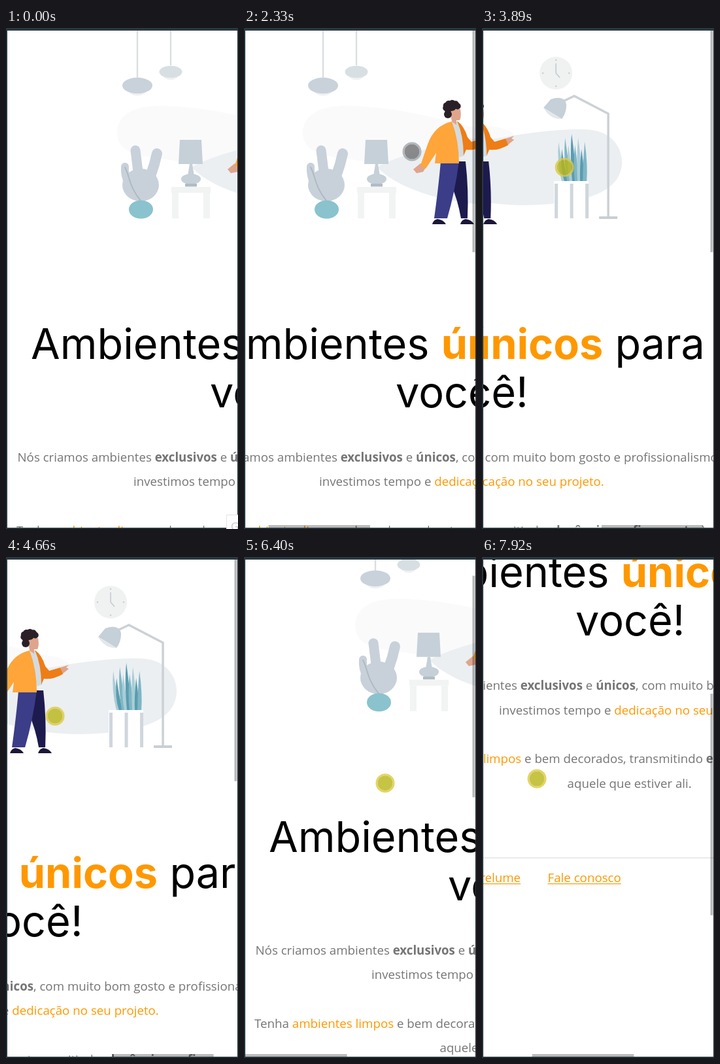
Recreate the animation shown at these times as an HTML page with a canvas. Size 355 px wide and 766 px high, loop 7990 ms.

```html
<!DOCTYPE html>
<html lang="pt-BR">
<head>
<meta charset="utf-8">
<title>Ambientes únicos</title>
<style>
html, body { margin: 0; width: 100%; height: 100%; overflow: hidden; background: #fff; }
canvas { display: block; width: 355px; height: 766px; }
</style>
</head>
<body>
<canvas id="stage"></canvas>
<script>
const W = 355, H = 766, LOOP = 7990;
const VIEW = { x: 2, y: 4, w: 352, h: 760 };
const PAGE = { w: 796, h: 1705 };
const canvas = document.getElementById('stage');
const ctx = canvas.getContext('2d');
const dpr = window.devicePixelRatio || 1;
canvas.width = W * dpr;
canvas.height = H * dpr;

const ZOOM = .9;
const SIZE = 20.8 * ZOOM, LINE = SIZE * 2;
const BODY = `${SIZE}px "Open Sans", sans-serif`;
const BOLD = 'bold ' + BODY;
const TITLE = `${72 * ZOOM}px Inter, sans-serif`;
const ORANGE = '#ff9800', GREY = '#757575', STONE = '#c5d0d8', PALE = '#f2f3f3', SKIN = '#dfa58c';

// The pointer flies in, then pulls the page with a few drags
const drag = (start, end, from, to) => ({ start, end, from, to });
const ENTER = drag(420, 1190, [372, 330], [245, 169]);
const DRAGS = [
  drag(1640, 2330, [337, 180], [257, 189]),
  drag(2600, 3050, [340, 196], [140, 204]),
  drag(3420, 3900, [255, 208], [126, 213]),
  drag(4400, 5220, [28, 236], [226, 266]),
  drag(5500, 6050, [5, 300], [216, 401]),
  drag(6220, 6840, [216, 401], [216, 130]),
  drag(7080, 7930, [253, 528], [84, 339])
];

const clamp = (v, lo, hi) => Math.min(hi, Math.max(lo, v));

function glide(t, start, end, from, to) {
  const u = clamp((t - start) / (end - start), 0, 1), k = u * u * (3 - 2 * u);
  return from.map((v, i) => v + (to[i] - v) * k);
}

function pose(t) {
  let last = ENTER, down = false, scroll = [0, 0];
  let point = glide(t, ENTER.start, ENTER.end, ENTER.from, ENTER.to);
  const limit = [PAGE.w - VIEW.w, PAGE.h - VIEW.h];
  for (const d of DRAGS) {
    if (t < last.end) break;
    point = glide(t, last.end, d.start, last.to, d.from);
    if (t < d.start) break;
    point = glide(t, d.start, d.end, d.from, d.to);
    scroll = scroll.map((s, i) => clamp(s + d.from[i] - point[i], 0, limit[i]));
    down = t < d.end;
    last = d;
  }
  return { point, scroll, down };
}

function rect(x, y, w, h, color) {
  ctx.fillStyle = color;
  ctx.fillRect(x, y, w, h);
}

function oval(x, y, rx, ry, color) {
  ctx.fillStyle = color;
  ctx.beginPath();
  ctx.ellipse(x, y, rx, ry, 0, 0, Math.PI * 2);
  ctx.fill();
}

function shape(d, color) {
  ctx.fillStyle = color;
  ctx.fill(new Path2D(d));
}

function line(d, color, width) {
  ctx.strokeStyle = color;
  ctx.lineWidth = width;
  ctx.stroke(new Path2D(d));
}

function shifted(dx, draw) {
  ctx.save();
  ctx.translate(dx, 0);
  draw();
  ctx.restore();
}

function pendant(x, y, r, color) {
  rect(x - 1.2, -10, 2.4, y, '#d9dee0');
  oval(x, y + 3, r * .72, r * .54, '#eff1f2');
  oval(x, y, r, r * .53, color);
}

function plant() {
  ctx.lineCap = 'round';
  line('M206 252L198 187', '#c8d1da', 15);
  line('M209 252Q224 225 231 192', '#c8d1da', 16);
  line('M206 252Q180 240 182 212', '#c8d1da', 12);
  oval(206, 240, 28, 25, '#c8d1da');
  line('M182 213C190 228 188 242 206 264', '#aebac2', 2);
  ctx.lineCap = 'butt';
  oval(206.5, 277.5, 18.5, 14, '#8ac3cd');
}

function tableLamp() {
  shape('M266 171H299L301 208H264Z', STONE);
  shape('M281 208H285L288 226H278Z', STONE);
  oval(283, 231, 15, 8, STONE);
  rect(274, 238, 18, 4.5, '#b0bcc4');
  rect(253, 243, 60, 9, PALE);
  for (const x of [254, 302]) rect(x, 252, 10, 39, PALE);
}

function man() {
  // Legs and shoes
  for (const x of [157, 200]) shape(`M${x} 300Q${x + 2} 293 ${x + 8} 292Q${x + 17} 293 ${x + 21} 300Z`, '#1b1738');
  shape('M186 204H208Q213 248 211 291H201Q196 262 186 240Z', '#1d1a4e');
  shape('M170 204H198Q192 250 180 291H160Q167 240 170 204Z', '#3b3d88');
  // Hands
  shape('M139 207L128 216L133 222L143 220L148 212Z', SKIN);
  shape('M234 169L247 165L243 169L247 171L237 179Z', SKIN);
  // Shirt and jacket
  shape('M187 143H196Q206 168 206 195L198 198Z', '#d3dbe0');
  shape('M195 142Q206 150 211 167L217 174L234 169L238 179Q222 188 209 186L205 195Q205 165 195 142Z', '#ee7d16');
  shape('M187 143Q160 149 150 178L139 210L147 215L163 191L161 207H198Q198 172 187 143Z', '#ffa53a');
  // Head
  shape('M184 124H200Q202 136 199 141H194V148L187 143Z', SKIN);
  for (let i = 0; i < 7; i++) {
    const a = 2.3 + i * .62;
    oval(187 + Math.cos(a) * 9, 121 + Math.sin(a) * 6, 5, 5, '#2b2028');
  }
  oval(186, 121, 8, 6, '#2b2028');
  oval(181, 132, 6, 6, '#2b2028');
}

function clock() {
  oval(113, 69, 25, 25, '#f0f1f1');
  for (let a = 0; a < 4; a++)
    oval(113 + 20 * Math.cos(a * Math.PI / 2), 69 + 20 * Math.sin(a * Math.PI / 2), 1.3, 1.3, '#c8cfd3');
  line('M113 54V69L119 76', '#c3ccd2', 1.6);
}

function floorLamp() {
  line('M124 112L141 104L193 131V289', '#cbd1d5', 3.5);
  shape('M94 122L105 109Q126 102 129 117Q129 130 122 139Z', STONE);
  shape('M94 122L122 139Q104 140 94 122Z', '#e2e8eb');
  rect(179, 288, 28, 4, '#c8cfd4');
}

function leafStand() {
  const tones = ['#a9cdd6', '#5a9cb0', '#7fb6c4'];
  for (let i = 0; i < 9; i++) {
    const x = 125 + i * 4, tip = 137 + (i - 4) * 5;
    const top = 162 + Math.abs(i - 4) * 3 + (i % 2) * 14;
    shape(`M${x - 3} 235Q${tip - 3} ${top + 30} ${tip} ${top}Q${tip + 5} ${top + 35} ${x + 3} 235Z`, tones[i % 3]);
  }
  rect(110, 234, 53, 57, '#fff');
  for (let i = 0; i < 3; i++) rect(111 + i * 23.5, 238, 5, 53, '#cfd6dc');
}

function illustration() {
  shape('M170 160C171 132 196 118 240 119C310 121 375 137 421 150Q458 154 462 170L420 220L290 215C262 190 171 212 170 160Z', '#fafafb');
  shape('M284 213C330 185 480 154 560 155C604 153 623 180 623 205C623 245 580 270 470 271C390 270 315 246 284 213Z', '#ebeff2');
  pendant(201, 88, 23, '#c9d2db');
  pendant(252, 67, 17.5, '#d8dfe3');
  plant();
  tableLamp();
  shifted(211, man);
  shifted(409, () => { clock(); floorLamp(); leafStand(); });
}

// Runs are [text, font, color]; returns the end position
function write(x, y, ...runs) {
  for (const [text, font, color] of runs) {
    ctx.font = font;
    ctx.fillStyle = color;
    ctx.fillText(text, x, y);
    x += ctx.measureText(text).width;
  }
  return x;
}

function link(text, x, y) {
  const end = write(x, y, [text, BODY, ORANGE]);
  rect(x, y + 2, end - x, 1.2, ORANGE);
}

function copy() {
  const title = s => [s, TITLE, '#000'];
  const text = (s, color = GREY) => [s, BODY, color];
  const bold = s => [s, BOLD, GREY];
  const row = n => 663 + n * LINE;

  write(38, 506, title('Ambientes '), ['únicos', 'bold ' + TITLE, ORANGE], title(' para'));
  write(312, 580, title('você!'));
  write(17.5, row(0), text('Nós criamos ambientes '), bold('exclusivos'), text(' e '), bold('únicos'),
    text(', com muito bom gosto e profissionalismo,'));
  write(195, row(1), text('investimos tempo e '), text('dedicação no seu projeto.', ORANGE));
  write(16, row(3), text('Tenha '), text('ambientes limpos', ORANGE), text(' e bem decorados, transmitindo '),
    bold('elegância'), text(' e '), bold('refinamento'), text(' à'));
  write(299.5, row(4), text('aquele que estiver ali.'));

  rect(2, 919, 784, 2, '#e8eaec');
  ctx.font = BODY;
  link('Vitrelume', 228 - ctx.measureText('Vitrelume').width, 957);
  link('Fale conosco', 269.5, 957);
}

function scrollbars([sx, sy]) {
  const color = 'rgba(0,0,0,.27)', kx = VIEW.w / PAGE.w, ky = VIEW.h / PAGE.h;
  rect(349.5, VIEW.y + sy * ky, 4, VIEW.h * ky, color);
  rect(VIEW.x + sx * kx, 760, VIEW.w * kx, 4, color);
}

function pointer([x, y], down) {
  ctx.globalAlpha = .8;
  oval(x, y, 11.5, 11.5, down ? '#b8b515' : '#6e6e70');
  ctx.strokeStyle = down ? '#ddc940' : '#a0a6ad';
  ctx.lineWidth = 3;
  ctx.beginPath();
  ctx.arc(x, y, 13, 0, Math.PI * 2);
  ctx.stroke();
  ctx.globalAlpha = 1;
}

function hint(t) {
  ctx.globalAlpha = clamp(1 - Math.floor(t / 70) / 3, 0, 1);
  rect(337, 744, 18, 22, '#fff');
  line('M355 744.5H337.5V766', '#e3e3e3', 1);
  write(344, 768, ['G', '17px "Open Sans", sans-serif', '#c4c4c4']);
  ctx.globalAlpha = 1;
}

function draw(t) {
  const { point, scroll, down } = pose(t);
  ctx.setTransform(dpr, 0, 0, dpr, 0, 0);
  rect(0, 0, W, H, '#293840');
  ctx.save();
  ctx.beginPath();
  ctx.rect(VIEW.x, VIEW.y, VIEW.w, VIEW.h);
  ctx.clip();
  rect(0, 0, W, H, '#fff');
  ctx.save();
  ctx.translate(-scroll[0], -scroll[1]);
  illustration();
  copy();
  ctx.restore();
  if (t >= DRAGS[0].start) scrollbars(scroll);
  if (t >= ENTER.start) pointer(point, down);
  ctx.restore();
  if (t < 210) hint(t);
}

let origin;
function tick(now) {
  origin ??= now;
  draw((now - origin) % LOOP);
  requestAnimationFrame(tick);
}
requestAnimationFrame(tick);
</script>
</body>
</html>
```
